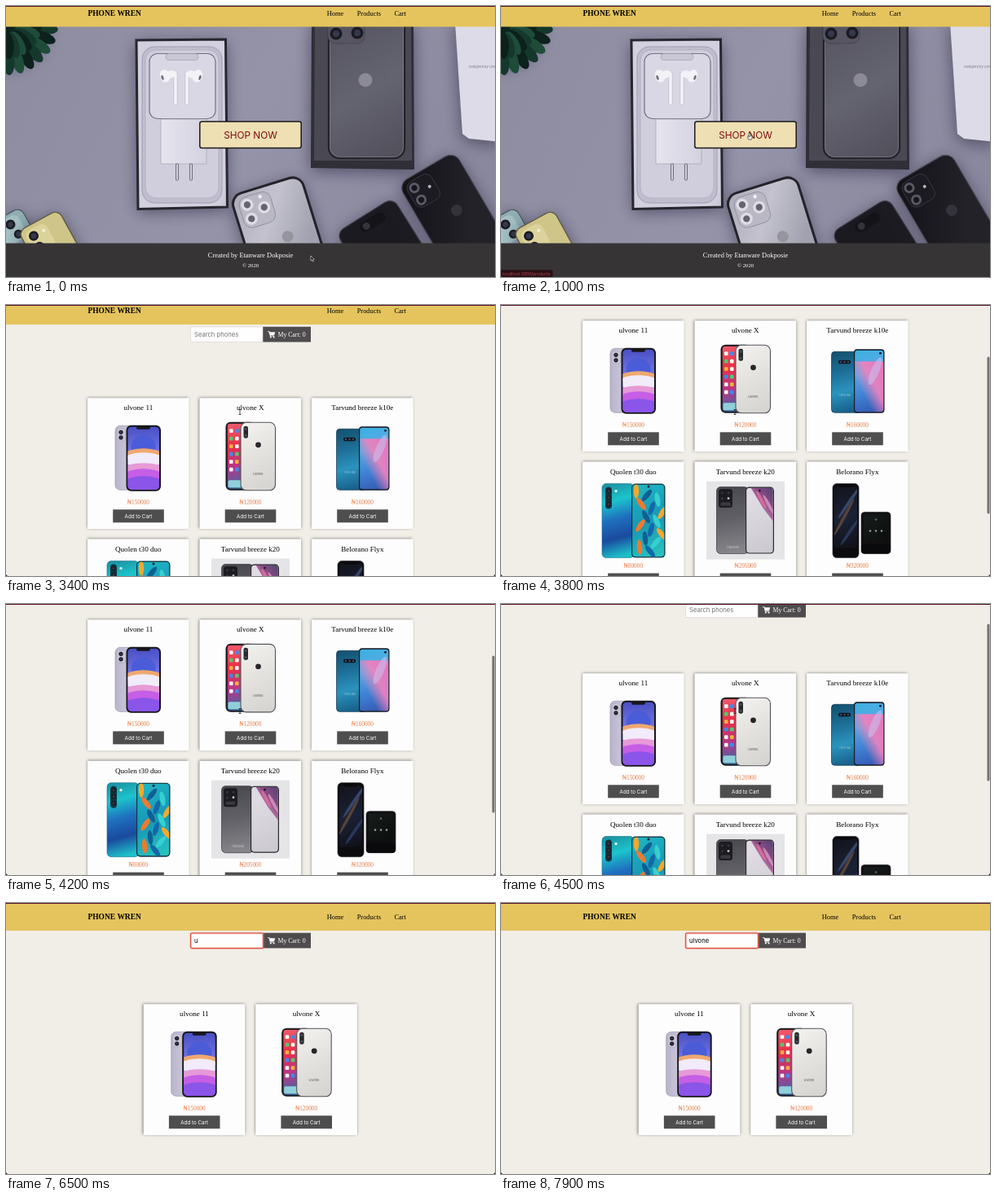
Recreate the animation shown at these times as an HTML page with a canvas. Size 600x333 px, loop 8 s.

```html
<!DOCTYPE html>
<html lang="en">
<head>
<meta charset="utf-8">
<title>Phone shop</title>
<style>
html, body { margin: 0; width: 100%; height: 100%; overflow: hidden; background: #f1eee7; }
canvas { display: block; width: 600px; height: 333px; }
</style>
</head>
<body>
<canvas id="stage"></canvas>
<script>
const W = 600, H = 333, LOOP = 8000;
const SERIF = '"Liberation Serif", serif', SANS = 'Inter, sans-serif';
const canvas = document.getElementById('stage');
const c = canvas.getContext('2d');
const ratio = window.devicePixelRatio || 1;
canvas.width = W * ratio;
canvas.height = H * ratio;

// ---- helpers ----
function box(x, y, w, h, r, fill, stroke, line = 1) {
  c.beginPath();
  c.roundRect(x, y, w, h, r);
  if (fill) { c.fillStyle = fill; c.fill(); }
  if (stroke) { c.strokeStyle = stroke; c.lineWidth = line; c.stroke(); }
}
function poly(points, fill, stroke, line = 1) {
  c.beginPath();
  points.forEach(([x, y]) => c.lineTo(x, y));
  c.closePath();
  if (fill) { c.fillStyle = fill; c.fill(); }
  if (stroke) { c.strokeStyle = stroke; c.lineWidth = line; c.stroke(); }
}
function oval(x, y, rx, ry, fill, turn = 0) {
  c.beginPath();
  c.ellipse(x, y, rx, ry, turn, 0, 7);
  c.fillStyle = fill;
  c.fill();
}
const dot = (x, y, r, fill) => oval(x, y, r, r, fill);
function text(str, x, y, size, fill, font = SERIF, align = 'left', weight = '') {
  c.font = `${weight} ${size}px ${font}`;
  c.textAlign = align;
  c.fillStyle = fill;
  c.fillText(str, x, y);
}
function grad(x0, y0, x1, y1, ...colors) {
  const g = c.createLinearGradient(x0, y0, x1, y1);
  colors.forEach((col, i) => g.addColorStop(i / (colors.length - 1), col));
  return g;
}
function at(x, y, turn, draw) {
  c.save();
  c.translate(x, y);
  c.rotate(turn);
  draw();
  c.restore();
}
function clipped(x, y, w, h, r, draw) {
  c.save();
  c.beginPath();
  c.roundRect(x, y, w, h, r);
  c.clip();
  draw();
  c.restore();
}
function shaded(color, blur, dx, dy, draw) {
  c.save();
  c.shadowColor = color;
  c.shadowBlur = blur * ratio;
  c.shadowOffsetX = dx * ratio;
  c.shadowOffsetY = dy * ratio;
  draw();
  c.restore();
}
const cast = draw => shaded('rgba(38,34,60,.6)', 20, 0, 4, draw);
// Eased value from [time, value] pairs
function track(keys, t) {
  if (t <= keys[0][0]) return keys[0][1];
  for (let i = 1; i < keys.length; i++) {
    const [a, from] = keys[i - 1], [b, to] = keys[i];
    if (t <= b) {
      const u = (t - a) / (b - a);
      return from + (to - from) * u * u * (3 - 2 * u);
    }
  }
  return keys[keys.length - 1][1];
}
function lens(x, y, r, rim = '#1b1b20', glass = '#34384c') {
  dot(x, y, r, rim);
  dot(x, y, r * 0.55, glass);
}

// ---- product pictures, relative to the card corner ----
function purplePair() {
  box(34, 34, 30, 79, 6, grad(34, 0, 60, 0, '#b9b4cb', '#d6d2e3'), '#9d98b0', 0.7);
  box(36, 37, 11, 16, 4, '#c9c5d8', '#aaa5bb', 0.6);
  lens(41, 42, 2.6);
  lens(41, 48.5, 2.6);
  box(47.5, 33.5, 42.5, 81, 6, '#17171c');
  clipped(49.5, 35.5, 38.5, 77, 4.5, () => {
    c.fillStyle = grad(0, 36, 0, 113, '#4a50c4', '#7d80ee', '#8a5cea');
    c.fillRect(49, 35, 40, 79);
    oval(68.7, 60, 15, 14, '#4a5cd8');
    oval(68.7, 70, 24, 8, '#f0a870');
    oval(68.7, 76, 25, 9, '#f1ebfa');
    oval(68.7, 87, 25, 7, '#e69ad6');
    oval(68.7, 95, 24, 8, '#c65ee6');
    oval(68.7, 106, 26, 10, '#8a55e8');
  });
  box(60, 34.5, 17, 4, 2, '#17171c');
}
function whitePair() {
  box(32, 29.5, 36, 84, 6, '#1b1a1f');
  clipped(34, 31.5, 32, 80, 4, () => {
    c.fillStyle = grad(34, 32, 50, 112, '#f05a6c', '#e92f48', '#b5388a', '#2d6fa8');
    c.fillRect(34, 31, 34, 82);
    const tones = ['#f6f3f0', '#55c86a', '#f0b13c', '#3d8ce8', '#f6f3f0'];
    for (let i = 0; i < 12; i++)
      box(36.5 + (i % 2) * 7, 38 + (i >> 1) * 9.5, 4.6, 4.6, 1.2, tones[(i * 3) % 5]);
    box(35, 101, 30, 9, 2, '#8fd0d8');
  });
  box(50.5, 30, 42.5, 83.5, 7, grad(50, 30, 93, 113, '#f4f3f1', '#e3e1dd', '#d4d3d0'), '#55545a', 1.1);
  box(54, 34.5, 5.5, 15, 2.7, '#27272c');
  dot(56.7, 38, 1.6, '#4c4c58');
  dot(56.7, 46, 1.6, '#4c4c58');
  dot(72, 57.5, 3.4, '#26262a');
  text('Ulvone', 71.7, 94.5, 3.8, '#55555a', SANS, 'center');
}
function bluePair() {
  box(30.5, 38, 36, 75, 4, grad(30, 38, 50, 112, '#14506c', '#1c6c94', '#2b93bd', '#17618a'), '#0f344c', 0.7);
  box(39, 48.5, 15, 4.5, 2, '#10141c');
  [42, 46.5, 51].forEach(x => dot(x, 50.7, 1.3, '#3c4a60'));
  text('TARVUND', 47, 93, 3, '#9cc6da', SANS, 'center');
  box(58, 35, 37.5, 78.5, 4, '#161b26');
  clipped(59.2, 36.5, 35, 75.5, 3.2, () => {
    c.fillStyle = grad(59, 40, 84, 112, '#3fb0e2', '#58a8e4', '#3f83d4', '#3459b4');
    c.fillRect(59, 36, 37, 77);
    c.fillStyle = grad(66, 84, 96, 68, 'rgba(240,130,190,0)', 'rgba(240,130,190,.9)', '#e478bc');
    c.fillRect(59, 50, 37, 63);
    oval(84, 62, 5, 18, 'rgba(200,190,235,.6)', 0.4);
  });
  dot(90.5, 40, 1.4, '#10141c');
}
function auroraPair() {
  box(24, 27, 39, 91, 5, grad(24, 28, 48, 116, '#1b8fa0', '#1cc4cc', '#1f6fbe', '#1a4a9e', '#1cc0ca'), '#136c8c', 0.6);
  box(28, 31, 8, 27, 4, '#12343f');
  [36, 44, 52].forEach(y => lens(32, y, 2.8));
  dot(41, 36, 1.7, '#eaf6ee');
  box(60, 27, 41.5, 91, 5, '#123744');
  clipped(61.2, 28.2, 39, 88.5, 4, () => {
    c.fillStyle = grad(61, 30, 101, 116, '#1fb6c4', '#1897b5', '#2bc5c0');
    c.fillRect(61, 28, 41, 90);
    // Leaf-like streaks fanning across the screen
    const tones = ['#f2a92d', '#0f5f94', '#35d0cf', '#ee7a2d', '#1268a8'];
    for (let i = 0; i < 15; i++)
      oval(66 + (i * 13) % 33, 36 + i * 5.3, 3.2, 9, tones[i % 5], 0.7 * Math.sin(i * 1.7));
  });
  dot(81, 30.5, 1.5, '#0c2028');
}
function greyPair() {
  c.fillStyle = '#e5e4e7';
  c.fillRect(14.5, 24, 96, 96);
  box(27, 31, 39, 82, 5, grad(27, 31, 40, 113, '#47474c', '#606066', '#85858a'), '#39393e', 0.7);
  box(29.5, 33.5, 17, 23, 3.5, '#1d1d21');
  [[34, 38.5], [34, 45.5], [41.5, 38.5]].forEach(([x, y]) => lens(x, y, 2.7));
  dot(41.5, 45, 1.4, '#c9c9cc');
  box(32, 50, 12, 4.2, 1.5, '#3a3a42');
  text('TARVUND', 47, 106.5, 3.2, '#d0d0d4', SANS, 'center');
  box(62.5, 31, 35, 82, 4.5, '#2b2930');
  clipped(63.7, 32.2, 32.6, 79.6, 3.6, () => {
    c.fillStyle = grad(64, 50, 92, 112, '#e0dbe2', '#d5d2da', '#cbc8d0');
    c.fillRect(63, 32, 34, 81);
    poly([[69, 32], [97, 32], [97, 74], [84, 57]], grad(73, 52, 95, 36, '#cf8fb4', '#8a4a86', '#5c4674'));
    oval(82, 47, 2, 12, '#d76a9c', -0.5);
    oval(91, 53, 2, 14, '#c98bb4', -0.5);
  });
  dot(80, 35.5, 1.3, '#1a181c');
}
function foldPair() {
  box(32, 27, 32, 91, 5, '#0c0c0f', '#2c2c32', 0.7);
  clipped(34, 30, 28, 76, 4, () => {
    c.fillStyle = grad(34, 30, 60, 106, '#12131b', '#1b2236', '#101117');
    c.fillRect(34, 30, 28, 77);
    oval(52, 50, 2, 24, '#36476a', 0.6);
    oval(46, 68, 1.8, 26, '#584236', 0.5);
    oval(53, 86, 2, 20, '#28365a', 0.6);
  });
  box(40, 27.5, 16, 4, 2, '#0a0a0c');
  box(67, 62, 36, 51, 4, '#101012', '#2c2c30', 0.7);
  box(70, 65, 30, 32, 2.5, grad(70, 65, 100, 97, '#171d1c', '#0b0e0d'));
  [78, 85, 92].forEach(x => dot(x, 85, 1.3, '#8d9490'));
  dot(85, 71, 1.4, '#59605c');
  box(67, 101, 36, 12, 4, '#0a0a0c');
}

const products = [
  ['ulvone 11', '150000', purplePair],
  ['ulvone X', '120000', whitePair],
  ['Tarvund breeze k10e', '160000', bluePair],
  ['Quolen t30 duo', '80000', auroraPair],
  ['Tarvund breeze k20', '205000', greyPair],
  ['Belorano Flyx', '320000', foldPair]
];

function card([name, price, picture], x, y) {
  at(x, y, 0, () => {
    shaded('rgba(0,0,0,.55)', 3.5, -0.4, -0.4, () => box(0, 0, 124.7, 161, 0, '#fdfdfd'));
    text(name, 62.3, 15, 9.1, '#000', SERIF, 'center');
    picture();
    text('₦' + price, 62.3, 130.7, 7.3, '#ea7c48', SERIF, 'center');
    c.fillStyle = '#4f4e4f';
    c.fillRect(31.2, 137, 62.6, 16);
    text('Add to Cart', 62.5, 147.4, 6.25, '#fff', SANS, 'center');
  });
}

// ---- pages ----
function header(top) {
  c.fillStyle = '#e5c45e';
  c.fillRect(0, top, W, 34);
  text('PHONE WREN', 100.5, top + 20, 9.45, '#000', SERIF, 'left', 'bold');
  text('Home', 393.7, top + 20, 8.38, '#000');
  text('Products', 430.7, top + 20, 8.38, '#000');
  text('Cart', 476.4, top + 20, 8.38, '#000');
}

function plant() {
  cast(() => oval(0, 24, 50, 48, '#0d241d'));
  for (let i = 0; i < 14; i++) {
    const a = 0.1 + (i % 7) * 0.24, r = i < 7 ? 46 : 26;
    oval(2 + Math.cos(a) * r, 23 + Math.sin(a) * r, 16, 7,
      ['#15382c', '#0c211b', '#1f4c39'][i % 3], a);
  }
}

function earbud(x, side) {
  oval(x, 86, 6, 8, '#f3f2f7', side * 0.35);
  oval(x + side * 3, 88, 1.4, 3, '#6d6a7e', side * 0.35);
  box(x - side * 13 - 2.2, 81, 4.4, 41, 2.2, '#f3f2f7', '#aaa7b8', 0.5);
  oval(x - side * 7, 84, 7.5, 4.5, '#f3f2f7', side * 0.2);
}

function giftBox() {
  const edge = [[160, 42], [269.5, 41], [271.5, 247], [162, 249.5]];
  cast(() => poly(edge, '#28262e'));
  poly(edge, '#d2d0de', '#28262e', 3);
  box(167, 50, 98, 192, 15, '#bfbdce', '#a19eb2', 1);
  box(171, 54, 90, 182, 13, '#d0cedc', '#aeabbd', 0.8);
  box(176, 58.5, 81, 80, 10, '#d9d7e3', '#737084', 1.2);
  box(196, 58.5, 40, 8, 4, '#c9c7d6', '#9a97aa', 0.6);
  earbud(195, -1);
  earbud(235, 1);
  box(190, 139, 56, 55, 1, grad(190, 0, 246, 0, '#e6e4ee', '#d4d2df'), '#a5a2b6', 0.7);
  [208.5, 225.5].forEach(x => box(x, 194, 3, 20, 1, '#d3d1dd', '#55525f', 0.8));
}

function darkBox() {
  const edge = [[375, 20], [500, 20], [501, 201], [374, 199]];
  cast(() => poly(edge, '#302e36'));
  poly([[379, 20], [497, 20], [498, 190], [378, 190]], '#4a4953');
  box(396, 0, 93, 187, 13, grad(396, 25, 489, 187, '#555460', '#646370', '#4f4e59'), '#24232b', 2.4);
  box(397.5, 2, 90, 183.5, 12, null, '#85848f', 0.7);
  box(395, 8, 45, 38, 9, '#565561', '#42414c', 0.8);
  lens(405, 34, 7.5);
  lens(431, 33, 7.5);
  dot(441, 91, 8.5, '#8b8a96');
}

function whiteBox() {
  const edge = [[551, 20], [606, 20], [606, 167], [568, 163], [560, 157]];
  cast(() => poly(edge, '#dddbe7'));
  text('Designed by Ulvone', 568, 75.5, 4, '#77748a', SANS);
}

function slab(x, y, turn, w, r, fill, rim, line, details) {
  at(x, y, turn, () => {
    cast(() => box(0, 0, w, 150, r, rim));
    box(0, 0, w, 150, r, fill, rim, line);
    details();
  });
}

function loosePhones() {
  slab(-28, 272, -0.5, 52, 9, '#8fadb2', '#47575f', 1.2, () => {
    box(12, 4, 32, 32, 8, '#a3c0c4');
    lens(31, 13, 6);
    lens(34, 28, 5.5);
  });
  slab(15, 277, -0.5, 56, 9, '#cfc588', '#625c48', 1.4, () => {
    box(5, 5, 29, 33, 8, '#dcd39c');
    lens(14, 14, 6);
    lens(14, 29, 6);
    dot(28, 14, 2, '#f2eed6');
  });
  slab(275, 234, -0.3, 90, 14, grad(0, 0, 90, 60, '#acabb8', '#c3c2ce', '#a2a1af'), '#24222a', 3, () => {
    box(7, 6, 40, 39, 10, '#b9b8c4', '#8d8b9b', 0.8);
    [[17, 16], [17, 34], [36, 25]].forEach(([x, y]) => lens(x, y, 7.5, '#dedde5', '#65636f'));
    dot(35, 11, 2.2, '#f3f1f6');
    dot(53, 68, 7, '#96959f');
  });
  slab(405, 279, -0.56, 82, 11, '#1b1a20', '#3d3b46', 1.2, () => {
    box(28, 6, 34, 13, 6, '#141318');
    dot(36, 12.5, 4.5, '#34333d');
  });
  slab(481, 219, -0.53, 80, 13, grad(0, 0, 80, 50, '#121116', '#232229'), '#4a4854', 1.2, () => {
    box(6, 5, 34, 35, 9, '#1c1b21', '#3c3a45', 0.8);
    lens(15, 14, 6.5, '#5a5865', '#17161b');
    lens(15, 31, 6.5, '#5a5865', '#17161b');
    dot(32, 22, 2, '#b5b3bc');
    dot(46, 64, 7, '#34333b');
  });
}

function homePage() {
  c.fillStyle = grad(0, 25, W, 291, '#8d8ca1', '#9493a8', '#87869c');
  c.fillRect(0, 25, W, 267);
  plant();
  giftBox();
  darkBox();
  whiteBox();
  loosePhones();
  box(237.8, 142, 124.4, 32.5, 2.5, '#eee0b2', '#1c1a1c', 1.5);
  text('SHOP NOW', 300, 163, 11.8, '#7d0c14', SANS, 'center');
  c.fillStyle = '#363435';
  c.fillRect(0, 291.5, W, 42);
  text('Created by Etanware Dokposie', 300, 309.3, 8.38, '#fff', SERIF, 'center');
  text('© 2020', 300, 321, 6.7, '#fff', SERIF, 'center');
  header(-8.5);
}

function cartIcon(x, y) {
  c.strokeStyle = '#fff';
  c.lineWidth = 1.1;
  c.beginPath();
  c.moveTo(x, y + 0.7);
  c.lineTo(x + 1.8, y + 0.7);
  c.lineTo(x + 3.2, y + 6);
  c.lineTo(x + 8, y + 6);
  c.stroke();
  poly([[x + 2.2, y + 1.3], [x + 9, y + 1.3], [x + 8, y + 5], [x + 3, y + 5]], '#fff');
  dot(x + 3.6, y + 7.6, 1, '#fff');
  dot(x + 7.4, y + 7.6, 1, '#fff');
}

const QUERY = 'ulvone', FOCUS = 5900, TYPE = 6500, STEP = 200;

function searchBar(t, y) {
  const focus = t >= FOCUS;
  const typed = QUERY.slice(0, Math.max(0, Math.floor((t - TYPE) / STEP) + 1));
  box(226.7, y, 88.6, 18.5, 0, '#fefefe', '#dad7d2', 0.7);
  c.fillStyle = '#4f4c4e';
  c.fillRect(315.3, y - 0.3, 58.7, 18.8);
  cartIcon(321.2, y + 5);
  text('My Cart: 0', 333.5, y + 11.7, 7.75, '#fff');
  if (focus) {
    box(226.6, y, 89, 18.6, 1.5, null, 'rgba(240,120,100,.45)', 2.4);
    box(226.6, y, 89, 18.6, 1.5, null, '#dc5548', 1.1);
  }
  text(typed || 'Search phones', 231, y + 12.3, 7.65, typed ? '#000' : '#757575', SANS);
  if (focus && (t - FOCUS) % 1060 < 530) {
    const end = typed ? c.measureText(typed).width : 0;
    c.fillStyle = '#111';
    c.fillRect(231.4 + end, y + 4.5, 0.6, 9.5);
  }
}

const scrollKeys = [[3450, 10], [3800, 105], [4050, 128], [4500, 39], [4850, 0]];

function shopPage(t) {
  const scroll = track(scrollKeys, t);
  c.fillStyle = '#f1eee7';
  c.fillRect(0, 0, W, H);
  const found = t < TYPE ? products : products.slice(0, 2);
  const left = t < TYPE ? 100 : 168.7;
  found.forEach((p, i) =>
    card(p, left + (i % 3) * 137.5, 124.3 + Math.floor(i / 3) * 173.3 - scroll));
  searchBar(t, 37 - scroll);
  header(-scroll);
  const shown = t < 3500 ? 0 : track([[5200, 1], [5500, 0]], t);
  if (shown) {
    c.globalAlpha = shown;
    box(596.5, 1.5 + scroll * 0.59, 3, 193, 1.5, '#73716f');
    c.globalAlpha = 1;
  }
}

// ---- pointer ----
const px = [[100, 374], [900, 305], [1900, 305], [2500, 287], [4600, 287], [5000, 280.5], [5300, 280.5], [5700, 268]];
const py = [[100, 307], [900, 158], [1900, 158], [2500, 131.5], [4600, 131.5], [5000, 69], [5300, 69], [5700, 46]];

function pointer(t) {
  if (t >= TYPE) return;
  at(track(px, t), track(py, t), 0, () => {
    if ((t >= 2400 && t < 4600) || t >= 5500) {
      c.strokeStyle = '#222';
      c.lineWidth = 0.8;
      c.beginPath();
      c.moveTo(-1.5, -3); c.lineTo(1.5, -3);
      c.moveTo(0, -3); c.lineTo(0, 3);
      c.moveTo(-1.5, 3); c.lineTo(1.5, 3);
      c.stroke();
    } else if (t >= 800 && t < 1500) {
      box(-2, 1, 5, 5, 1.5, '#fff', '#111', 0.7);
      box(-1, -2, 1.8, 5, 0.9, '#fff', '#111', 0.6);
    } else {
      poly([[0, 0], [0, 6], [1.4, 4.8], [2.4, 7], [3.4, 6.5], [2.5, 4.4], [4.3, 4.2]], '#111', '#eee', 0.6);
    }
  });
}

function statusBar() {
  box(-2, 324.3, 65.5, 12, 2, '#2c1015');
  text('localhost:3000/products', 2, 330.7, 5, '#b4484c', SANS);
}

function draw(now) {
  const t = Math.floor((now % LOOP) / 100) * 100;
  c.setTransform(ratio, 0, 0, ratio, 0, 0);
  c.clearRect(0, 0, W, H);
  if (t < 1500) homePage();
  else shopPage(t);
  if (t >= 1000 && t < 2100) statusBar();
  c.fillStyle = '#5a1428';
  c.fillRect(0, 0, W, 1);
  poly([[0, 331], [2, 333], [0, 333]], '#333');
  poly([[600, 331], [598, 333], [600, 333]], '#333');
  pointer(t);
}

const start = performance.now();
function tick() {
  draw(performance.now() - start);
  requestAnimationFrame(tick);
}
tick();
</script>
</body>
</html>
```
